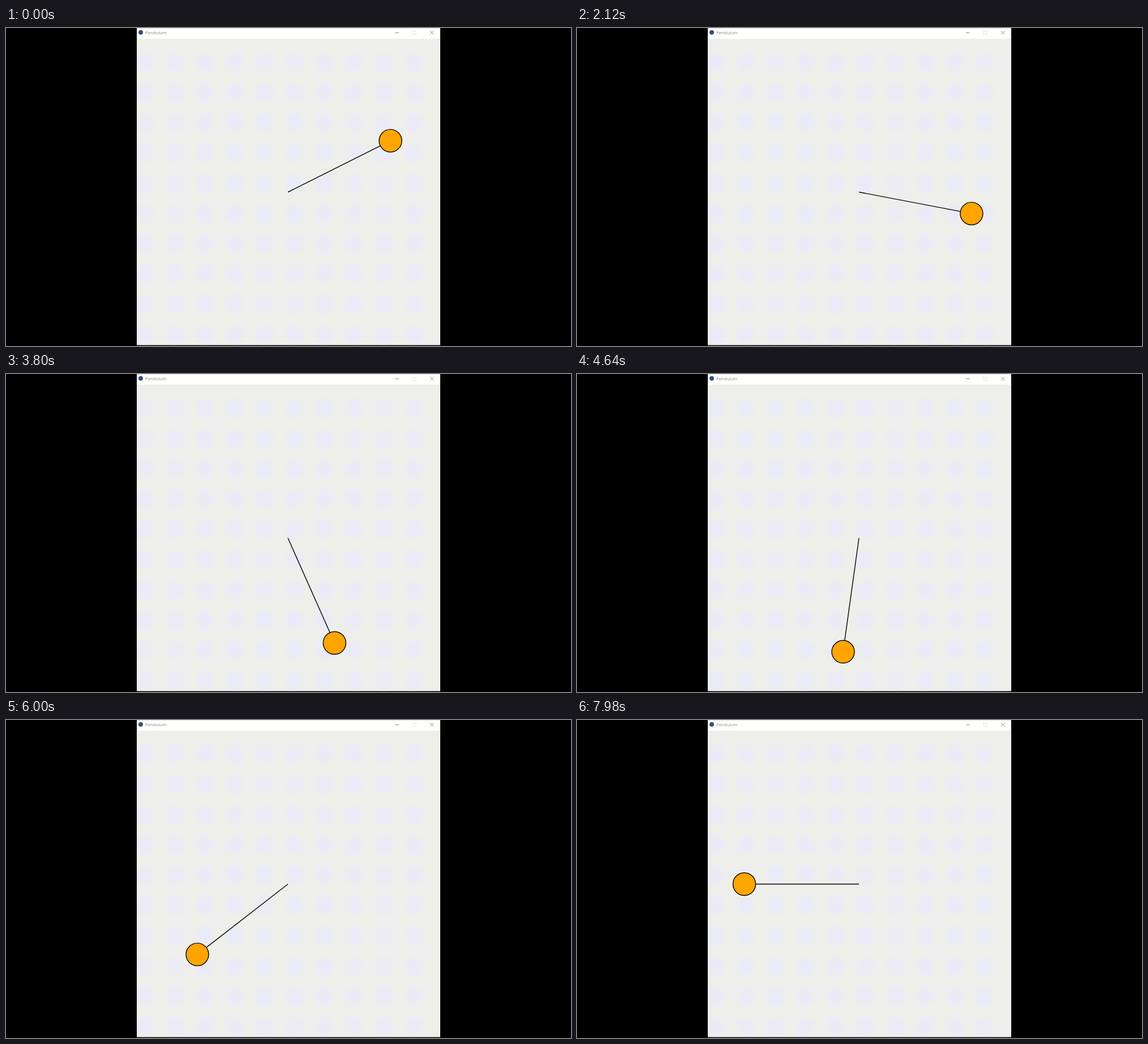
Animation, 998 px wide and 561 px high, one loop 8 s. Source, as an HTML page:

```html
<!DOCTYPE html>
<html lang="en">
<head>
<meta charset="utf-8">
<title>Pendulum</title>
<style>
  html, body { margin: 0; width: 100%; height: 100%; overflow: hidden; background: #000; }
  svg { display: block; width: 100%; height: 100%; }
  text { font: 7.8px "Open Sans", "Noto Sans", sans-serif; fill: #868686; }
  .buttons { fill: none; stroke: #808080; stroke-width: .9; }
</style>
</head>
<body>
<svg viewBox="0 0 998 561">
  <defs>
    <radialGradient id="tint">
      <stop offset="0" stop-color="#ebebf8"/>
      <stop offset=".5" stop-color="#ebebf6"/>
      <stop offset="1" stop-color="#ebebf6" stop-opacity="0"/>
    </radialGradient>
    <pattern id="spots" x="219" y="33.5" width="52.8" height="53.4" patternUnits="userSpaceOnUse">
      <circle cx="26.4" cy="26.7" r="21" fill="url(#tint)"/>
    </pattern>
  </defs>

  <rect x="231" width="536" height="559.5" fill="#eeeeeb"/>
  <rect x="231" y="33.5" width="516" height="526" fill="url(#spots)"/>

  <rect x="231" width="536" height="19" fill="#fffffd"/>
  <rect x="231" width="536" height=".7" fill="#d8d8d8"/>
  <circle cx="238" cy="7.8" r="4" fill="#34507a"/>
  <text x="246" y="11.4">Pendulum</text>
  <g class="buttons">
    <path d="M687 8.5h7"/>
    <rect x="718" y="5.5" width="6" height="6" stroke="#e2e2e2"/>
    <path d="M749 5l6.5 6.5M755.5 5l-6.5 6.5"/>
  </g>

  <g stroke="#000" stroke-width="1.4">
    <line id="rod" x1="498" y1="289.5"/>
    <circle id="bob" r="20" fill="#ffa500"/>
  </g>
</svg>
<script>
  const LOOP = 8000, LENGTH = 202.5, PIVOT = { x: 498, y: 289.5 };
  const rod = document.getElementById('rod');
  const bob = document.getElementById('bob');

  // Swing states: step, angle from straight down (deg), speed (deg per 10 steps)
  const swing = [
    [0, 116.57, -4.05],
    [29, 97.45, -9.15],
    [62, 57.2, -15.25],
    [100, -7.94, -17.6],
    [128, -52.2, -13.4],
    [145, -71.9, -9.78],
    [171, -90, -4.1]
  ];

  // Steps come in threes, held for 20, 20 and 100 ms
  function stepAt(ms) {
    const shifted = ms + 20, phase = shifted % 140;
    return 3 * Math.floor(shifted / 140) + (phase < 20 ? 0 : phase < 40 ? 1 : 2) - 1;
  }

  // Cubic Hermite curve between neighbouring states
  function angleAt(step) {
    const next = Math.max(1, swing.findIndex(s => s[0] >= step));
    const [n0, a0, v0] = swing[next - 1], [n1, a1, v1] = swing[next];
    const span = (n1 - n0) / 10, u = (step - n0) / (n1 - n0), w = 1 - u;
    return w * w * (1 + 2 * u) * a0 + u * u * (1 + 2 * w) * a1
      + span * u * w * (w * v0 - u * v1);
  }

  function place(el, names, values) {
    names.forEach((name, i) => el.setAttribute(name, values[i].toFixed(2)));
  }

  function draw() {
    const angle = angleAt(stepAt(performance.now() % LOOP)) * Math.PI / 180;
    const end = [PIVOT.x + LENGTH * Math.sin(angle), PIVOT.y + LENGTH * Math.cos(angle)];
    place(rod, ['x2', 'y2'], end);
    place(bob, ['cx', 'cy'], end);
    requestAnimationFrame(draw);
  }
  draw();
</script>
</body>
</html>
```
